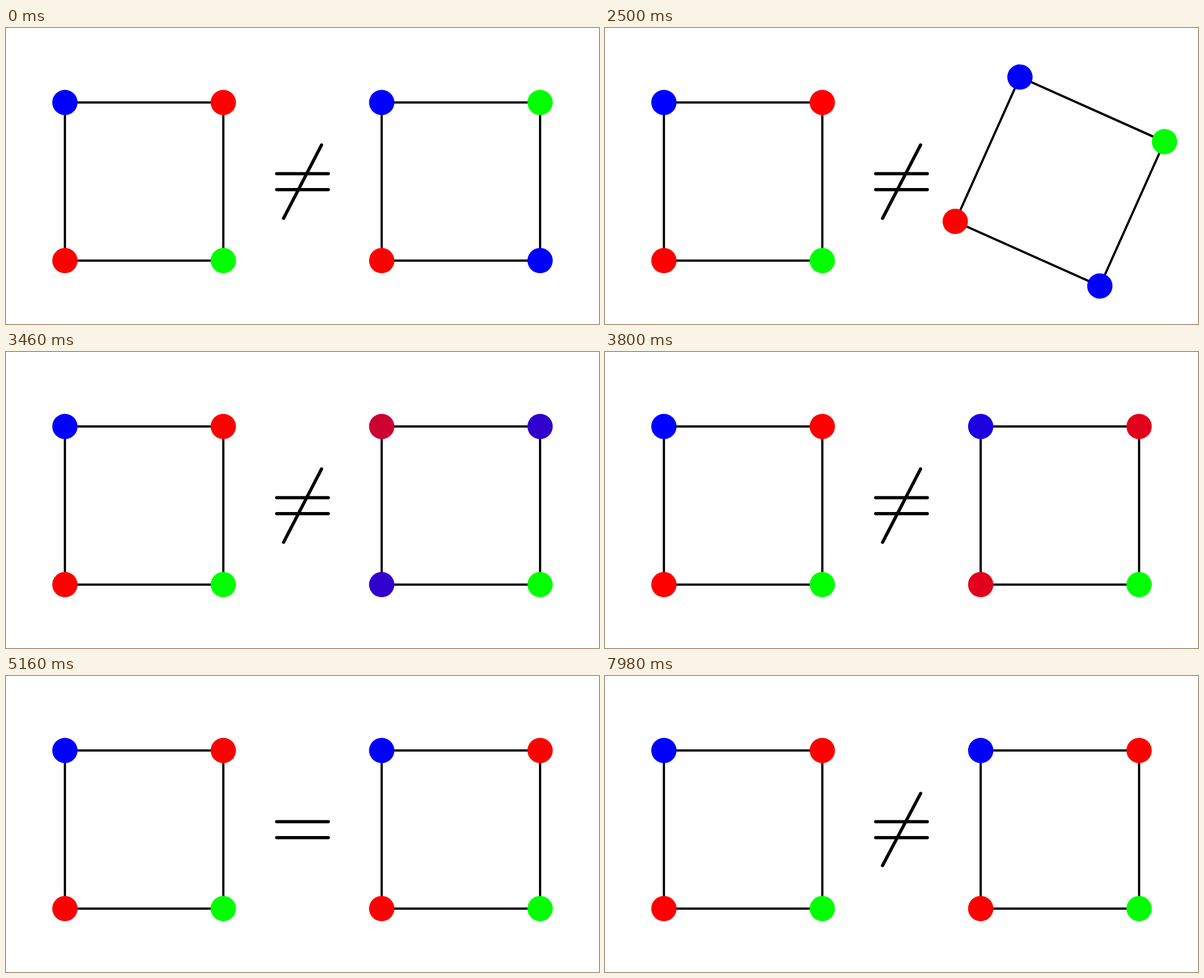
These frames come from a looping animation (1058 px wide and 529 px high, 8 s). An HTML page with a canvas:

```html
<!DOCTYPE html>
<html lang="en">
<head>
<meta charset="utf-8">
<title>Coloured squares</title>
<style>
  html, body { margin: 0; width: 100%; height: 100%; overflow: hidden; background: #fff; }
  canvas { display: block; width: 100%; height: 100%; }
</style>
</head>
<body>
<canvas id="stage" width="1058" height="529"></canvas>
<script>
const ctx = document.getElementById('stage').getContext('2d');
const LOOP = 8000;
const RED = [255, 0, 0], GREEN = [0, 255, 0], BLUE = [0, 0, 255];
const HALF = 141.3, DOT = 22.6, CENTER_Y = 274.4;

// Equality sign: slash and bars as [x1, y1, x2, y2]
const SLASH = [563, 209, 495.3, 340];
const UPPER = [575, 260.3, 483, 260.3];
const LOWER = [575, 288.8, 483, 288.8];
const SEED = [562.8, 209.5, 562.8, 209.5];
const BAR_WIDTH = 5.8;

const mix = (a, b, p) => a + (b - a) * p;
const mixAll = (a, b, p) => a.map((v, i) => mix(v, b[i], p));
const sigmoid = x => 1 / (1 + Math.exp(-x));

// Sigmoid easing over one second, normalised to run from 0 to 1
function ease(t, start) {
  const a = Math.min(1, Math.max(0, (t - start) / 1000));
  const edge = sigmoid(-5);
  return (sigmoid(10 * (a - 0.5)) - edge) / (1 - 2 * edge);
}

function line([x1, y1, x2, y2], width, alpha = 1) {
  if (width <= 0 || alpha <= 0) return;
  ctx.globalAlpha = alpha;
  ctx.lineWidth = width;
  ctx.beginPath();
  ctx.moveTo(x1, y1);
  ctx.lineTo(x2, y2);
  ctx.stroke();
  ctx.globalAlpha = 1;
}

// Colours run clockwise from the top left corner
function square(cx, colors, angle = 0) {
  ctx.save();
  ctx.translate(cx, CENTER_Y);
  ctx.rotate(angle);
  ctx.lineWidth = 4;
  ctx.strokeRect(-HALF, -HALF, 2 * HALF, 2 * HALF);
  colors.forEach((color, i) => {
    ctx.fillStyle = `rgb(${color.map(Math.round)})`;
    ctx.beginPath();
    ctx.arc(i % 3 ? HALF : -HALF, i < 2 ? -HALF : HALF, DOT, 0, 2 * Math.PI);
    ctx.fill();
  });
  ctx.restore();
}

// p = 0 is "not equal", p = 1 is "equal"
function sign(p) {
  line(UPPER, BAR_WIDTH, 1 - p);
  line(LOWER, BAR_WIDTH, 1 - p);
  // The slash swings into the upper bar, a second piece grows into the lower one
  const cos = 0.46;
  const thickness = Math.sqrt((1 - p) ** 2 + p ** 2 + 2 * p * (1 - p) * cos);
  line(mixAll(SLASH, UPPER, p), BAR_WIDTH * thickness);
  line(mixAll(SEED, LOWER, p), BAR_WIDTH * p);
}

function draw(t) {
  ctx.fillStyle = '#fff';
  ctx.fillRect(0, 0, 1058, 529);
  ctx.strokeStyle = '#000';
  ctx.lineCap = 'round';

  const turn = ease(t, 2100), recolor = ease(t, 3100);
  const right = [
    BLUE,
    GREEN,
    mixAll(BLUE, RED, recolor),
    mixAll(RED, BLUE, recolor)
  ];
  right[0] = mixAll(BLUE, RED, recolor);

  square(246.4, [BLUE, RED, GREEN, RED]);
  square(811.6, right, turn * Math.PI / 2);
  sign(ease(t, 4100) - ease(t, 7100));
}

function tick() {
  draw(performance.now() % LOOP);
  requestAnimationFrame(tick);
}
tick();
</script>
</body>
</html>
```
